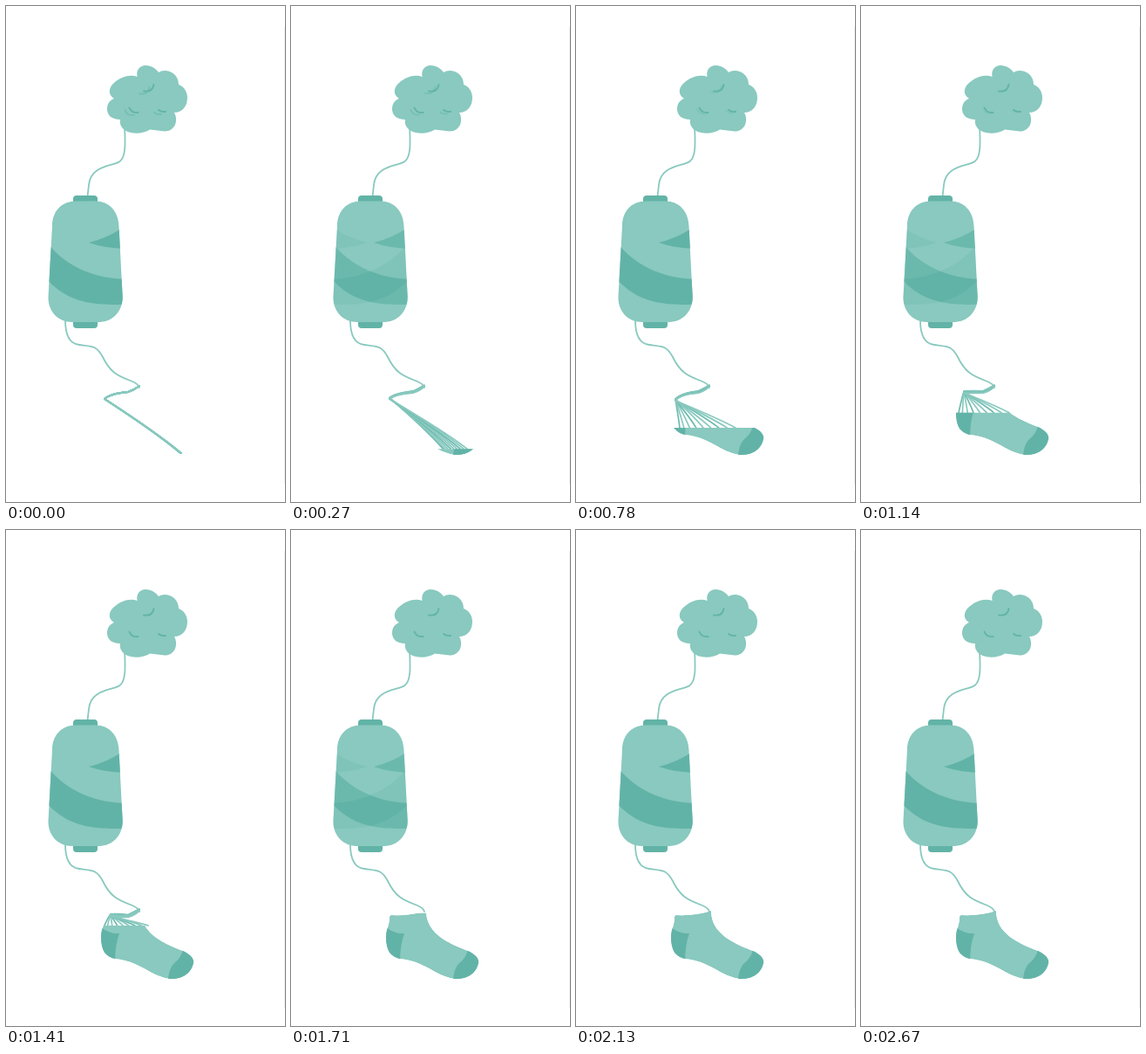
These frames come from a looping animation (320 by 568 pixels, 2700 ms). An HTML page:

```html
<!DOCTYPE html>
<html lang="en">
<head>
<meta charset="utf-8">
<title>From fibre to sock</title>
<style>
  html, body { margin: 0; width: 100%; height: 100%; overflow: hidden; background: #fff; }
  svg { display: block; width: 100vw; height: 100vh; }
  .light { fill: #89c9bf; }
  .dark { fill: #62b3a7; }
  .thread { fill: none; stroke: #89c9bf; stroke-width: 1.8; stroke-linecap: round; stroke-linejoin: round; }
  .crease { fill: none; stroke: #62b3a7; stroke-width: 1.8; stroke-linecap: round; }
  #wraps { isolation: isolate; }
  #back { mix-blend-mode: plus-lighter; }
</style>
</head>
<body>
<svg viewBox="0 0 320 568">
  <defs>
    <path id="spool" d="M80 223.500H103C118 223.500 129 235 129.500 252L133.700 333C134 350 122 362 107 362H76C60 362 48 350 48.500 333L53 252C53 235 64 223.500 80 223.500Z"/>
    <path id="sock" d="M115 441Q138 442 155 436C155 462 180 473 203 482C211 486 216 490 215 496C212 510 199 515 187 514C168 511 157 498 136 493C124 490 120 492 113 484C108 476 108 462 111 455Q113 449 113 443Q113 441 115 441Z"/>
    <g id="wrap">
      <path d="M95 271Q116 266 135 253V278Q112 277 95 271Z"/>
      <path d="M45 268C65 296 98 312 138 313V341.500C104 343 72 342 45 311Z"/>
    </g>
    <g id="creases">
      <path d="M158 97.500Q168 99 169.500 90"/>
      <path d="M141.500 116.500Q144 123 151.500 122"/>
      <path d="M175 119Q178 121.500 183 121"/>
    </g>
    <clipPath id="spoolClip"><use href="#spool"/></clipPath>
    <clipPath id="sockClip"><use href="#sock"/></clipPath>
    <clipPath id="knitClip"><rect id="knit" width="320" height="568"/></clipPath>
  </defs>

  <path d="M319.500 24V547" stroke="#eee"/>

  <path class="thread" d="M136 138C137 157 137.500 173 130.500 178C122 184 97 182 95 205L93.500 218"/>
  <path class="light" d="M131 130C121 130 116 125 116 118C116 112 119 108 124 106C117 102 117 94 124 88C132 81 142 78 150.500 81C149 73 154 68 160 68C167 68 172 72 175 76C182 71 198 75 198 90C204 92 208 98 208 105C208 115 202 122 193 122C198 131 194 143.500 182 143.500L165 141.500C157 147 140 148 133 139Q130 135 131 130Z"/>
  <use id="ghost" class="crease" href="#creases"/>
  <use class="crease" href="#creases"/>

  <path class="thread" d="M68 360C68 380 75 387 84 388C100 390 104 389 111 402C120 421 130 424 145 430Q152 433 153 437"/>
  <rect class="dark" x="77" y="217" width="28" height="14" rx="4"/>
  <rect class="dark" x="77" y="355" width="28" height="14" rx="4"/>
  <use class="light" href="#spool"/>
  <g id="wraps" class="dark" clip-path="url(#spoolClip)">
    <use id="front" href="#wrap"/>
    <use id="back" href="#wrap" transform="matrix(-1 0 0 1 182 0)"/>
  </g>

  <g id="strands" class="thread"></g>
  <g clip-path="url(#knitClip)">
    <g clip-path="url(#sockClip)">
      <use class="light" href="#sock"/>
      <path class="dark" d="M105 452Q118 463 130 462Q125 475 125 496H105Z"/>
      <path class="dark" d="M203 480Q201 490 193 496Q186 503 186 518H220V480Z"/>
    </g>
  </g>
</svg>
<script>
const LOOP = 2700, WRAP = LOOP / 4, COUNT = 9, KNITTED = 1770;
const $ = id => document.getElementById(id);
const lerp = (a, b, k) => a + (b - a) * k;

// Rows: time, knot x, knot y, left and right end of the strand fan
const fan = [
  [0, 113, 450, 200, 201],
  [540, 113, 449, 149, 203],
  [780, 114, 451, 119, 183],
  [1140, 118, 442, 112, 170],
  [KNITTED, 122, 440, 114, 154]
];

const strands = Array.from({ length: COUNT }, (_, i) => {
  const path = document.createElementNS('http://www.w3.org/2000/svg', 'path');
  path.setAttribute('stroke', i % 3 ? '#89c9bf' : '#6dbbaf');
  return $('strands').appendChild(path);
});

function fanAt(t) {
  const i = Math.max(1, fan.findIndex(row => row[0] >= t));
  const [a, b] = [fan[i - 1], fan[i]];
  return a.map((v, n) => lerp(v, b[n], (t - a[0]) / (b[0] - a[0])));
}

function drawStrands(t, cut) {
  const visible = t < 1690;
  $('strands').style.display = visible ? '' : 'none';
  if (!visible) return;
  const [, kx, ky, left, right] = fanAt(t);
  const spread = Math.min(1, t / 400);
  const endY = Math.min(512, cut);
  strands.forEach((path, i) => {
    const k = i / (COUNT - 1);
    const off = (k - .5) * 4 * spread + Math.sin(i * 9 + t / 60) * .5 * spread;
    const endX = lerp(left, right, k ** lerp(1, 1.25, spread));
    const y = ky + off * .5;
    path.setAttribute('stroke-width', lerp(2, 1.7, spread));
    path.setAttribute('d', `M153 ${435 + off * .4}Q148 ${439 + off} 140 ${442 + off * .6}` +
      `Q${kx + 6} ${Math.min(444, y) + off * .3} ${kx} ${y}` +
      `Q${lerp(kx, endX, .7)} ${lerp(y, endY, .64)} ${endX} ${endY}`);
  });
}

function draw(t) {
  const cut = 520 - .0475 * t;
  $('knit').setAttribute('y', t < KNITTED ? cut : 0);
  drawStrands(t, cut);

  const phase = t % WRAP / WRAP;
  const mix = phase > .35 && phase < .88 ? .25 : 0;
  $('front').setAttribute('opacity', 1 - mix);
  $('back').setAttribute('opacity', mix);

  const fade = Math.max(0, 1 - t / 1600);
  $('ghost').setAttribute('opacity', fade * .5);
  $('ghost').setAttribute('transform', `translate(${-5 * fade} ${3 * fade})`);
}

function tick() {
  draw(performance.now() % LOOP);
  requestAnimationFrame(tick);
}
tick();
</script>
</body>
</html>
```
